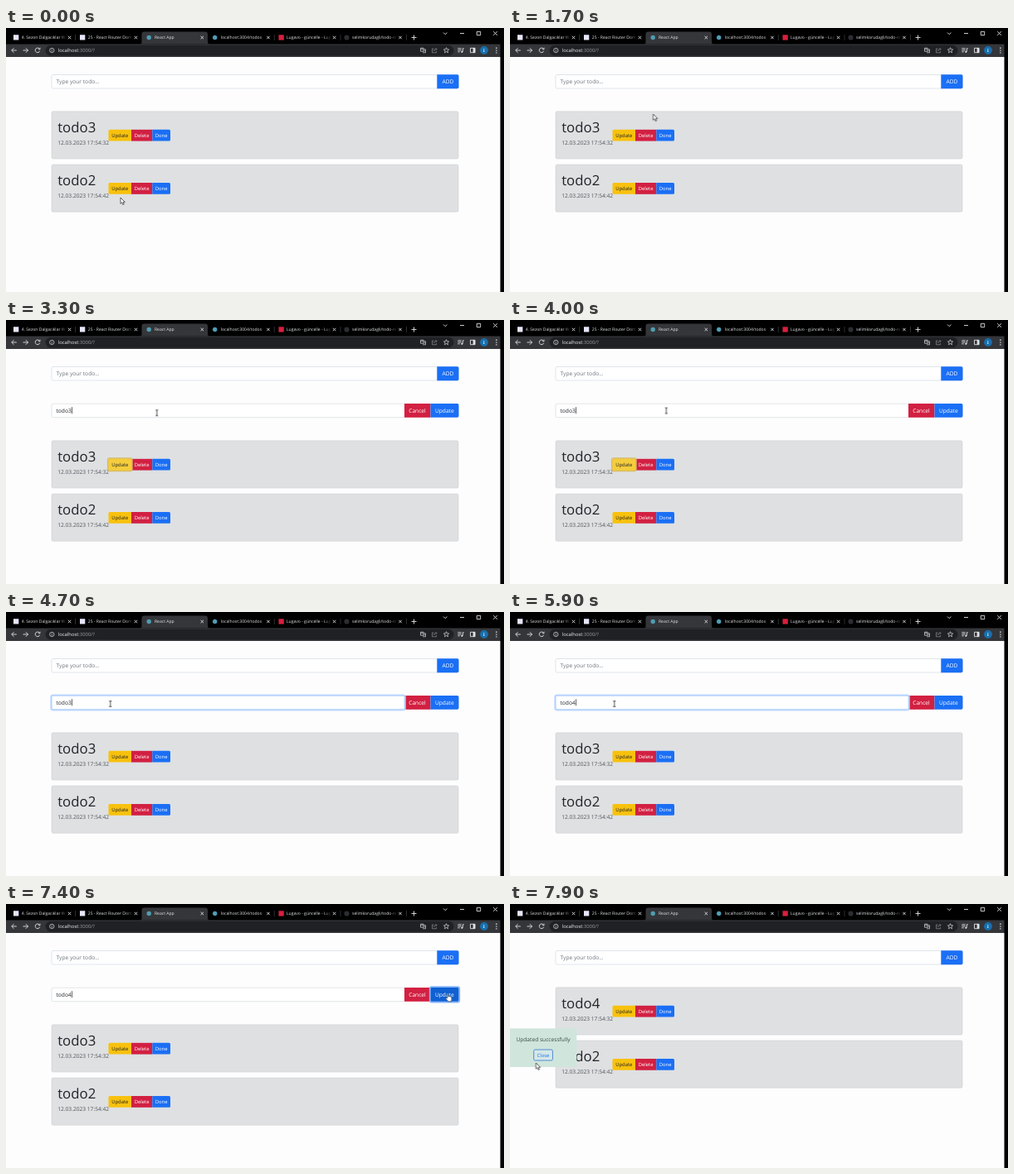
Animation of 600x319 px, one loop 8000 ms. Source, as an HTML page:

```html
<!DOCTYPE html>
<html lang="tr">
<head>
<meta charset="utf-8">
<title>React App</title>
<style>
html, body { margin: 0; width: 100%; height: 100%; overflow: hidden; background: #000; }
svg { display: block; width: 600px; height: 319px; }
text { font: 6.65px "Open Sans", "Noto Sans", sans-serif; fill: #212529; text-rendering: geometricPrecision; white-space: pre; }
.tabs text { font-size: 5.05px; fill: #e4e6e9; }
.url text { font-size: 5.85px; fill: #9aa0a6; }
.line { fill: none; stroke: #dfe1e5; stroke-width: .9; }
.title { font-size: 16.8px; font-weight: 500; }
.date { fill: #50555a; }
.small text { font-size: 5.9px; }
.mid { text-anchor: middle; }
.on { fill: #fff; }
.card { fill: #dee0e2; stroke: #c8cacd; stroke-width: .5; }
.field { fill: #fff; stroke: #ced4da; stroke-width: .6; }
.blue { fill: #1a6ff5; }
.red { fill: #d22042; }
.yellow { fill: #f8c10d; }

/* One loop is 8 s, so 1.25% is 100 ms */
.step { animation: 8s step-end infinite; }
.fade { animation: 8s linear infinite; }
.list { animation-name: list; }
.edit { animation-name: edit; }
.before { animation-name: before; }
.after { animation-name: after; }
.val3 { animation-name: val3; }
.val0 { animation-name: val0; }
.val4 { animation-name: val4; }
.warn { animation-name: warn; }
.focus { animation-name: focus; }
.caret { animation-name: caret; }
.save { animation-name: save; }
.ring { animation-name: ring; }
.toast { animation-name: toast; }
.pointer { animation: move 8s ease-in-out infinite; }
.arrow { animation-name: arrow; }
.beam { animation-name: beam; }
.hand { animation-name: hand; }

@keyframes list { 0%, 93.75%, 100% { transform: none; } 28.75% { transform: translateY(45px); } }
@keyframes edit { 0%, 93.75%, 100% { visibility: hidden; } 28.75% { visibility: visible; } }
@keyframes before { 0% { visibility: visible; } 93.75%, 100% { visibility: hidden; } }
@keyframes after { 0% { visibility: hidden; } 93.75%, 100% { visibility: visible; } }
@keyframes val3 { 0%, 66.25%, 100% { visibility: hidden; } 28.75% { visibility: visible; } }
@keyframes val0 { 0%, 71.25%, 100% { visibility: hidden; } 66.25% { visibility: visible; } }
@keyframes val4 { 0%, 93.75%, 100% { visibility: hidden; } 71.25% { visibility: visible; } }
@keyframes warn { 0%, 26.25% { opacity: 0; } 28.75%, 55.6% { opacity: 1; } 57.5%, 100% { opacity: 0; } }
@keyframes focus { 0%, 55.6% { opacity: 0; } 57.5%, 89.4% { opacity: 1; } 91.25%, 100% { opacity: 0; } }
@keyframes caret {
  0%, 62.2%, 78%, 89.4%, 100% { visibility: hidden; }
  55.6%, 66.25%, 71.25%, 84.6% { visibility: visible; }
}
@keyframes save { 0%, 87.25% { opacity: 0; } 89%, 93.7% { opacity: 1; } 93.75%, 100% { opacity: 0; } }
@keyframes ring { 0%, 89.4% { opacity: 0; } 91.25%, 93.7% { opacity: 1; } 93.75%, 100% { opacity: 0; } }
@keyframes toast { 0% { visibility: hidden; } 95%, 100% { visibility: visible; } }
@keyframes move {
  0%, 4% { transform: translate(138px, 205px); }
  11.25% { transform: translate(145px, 188px); }
  21.25% { transform: translate(172.5px, 104px); }
  26.9%, 33.75% { transform: translate(136.7px, 131px); }
  43.75%, 50% { transform: translate(188.3px, 109.5px); }
  55%, 80% { transform: translate(125.7px, 111px); }
  85% { transform: translate(400px, 128px); }
  88.75%, 93.75% { transform: translate(532.3px, 108px); }
  98.1%, 100% { transform: translate(31.3px, 192px); }
}
@keyframes arrow {
  0%, 28.75%, 82%, 93.75%, 100% { visibility: visible; }
  26.25%, 39.4%, 87.25% { visibility: hidden; }
}
@keyframes beam { 0%, 82%, 100% { visibility: hidden; } 39.4% { visibility: visible; } }
@keyframes hand {
  0%, 28.75%, 93.75%, 100% { visibility: hidden; }
  26.25%, 87.25% { visibility: visible; }
}
</style>
</head>
<body>
<svg viewBox="0 0 600 319">
  <defs>
    <linearGradient id="dim"><stop stop-color="#000" stop-opacity="0"/><stop offset="1"/></linearGradient>
    <g id="x"><path class="line" d="M-1.7-1.7 1.7 1.7M1.7-1.7-1.7 1.7"/></g>
    <g id="cut"><path fill="url(#dim)" d="M0 5h9v12H0z"/><path d="M9 5h10v12H9z"/></g>
    <g id="actions" class="small">
      <path class="yellow" d="M151 122.8v13.8h-26a1.5 1.5 0 0 1-1.5-1.5v-10.8a1.5 1.5 0 0 1 1.5-1.5z"/>
      <path class="red" d="M151 122.8h25.3v13.8H151z"/>
      <path class="blue" d="M176.3 122.8h20.2a1.5 1.5 0 0 1 1.5 1.5v10.8a1.5 1.5 0 0 1-1.5 1.5h-20.2z"/>
      <text class="mid" x="137.3" y="131.9">Update</text>
      <text class="mid on" x="163.6" y="131.9">Delete</text>
      <text class="mid on" x="187.1" y="131.9">Done</text>
    </g>
  </defs>

  <!-- Tab strip -->
  <path d="M0 0h600v319H0z"/>
  <path fill="#35363a" d="M161 19.5q2.5 0 2.5-2.5V7.500q0-3 3-3h73.500q3 0 3 3V17q0 2.500 2.500 2.500z"/>
  <g class="tabs">
    <path fill="#e6e5fb" d="M9 8.300h6.300v6.300H9zM89 8.300h6.300v6.300H89z"/>
    <circle cx="172.200" cy="11.500" r="2.700" fill="#4f9db4"/>
    <circle cx="251.700" cy="11.500" r="2.700" fill="#4f9db4"/>
    <path fill="#d8203f" d="M328.500 8.300h6.300v6.300h-6.300z"/>
    <circle cx="410.500" cy="11.500" r="3.100" fill="#2b2d31"/>
    <text x="18.800" y="13.300">4. Sezon Dalgacıklar We</text>
    <text x="98.800" y="13.300">25 - React Router Dom</text>
    <text x="179" y="13.300">React App</text>
    <text x="258.800" y="13.300">localhost:3004/todos</text>
    <text x="338" y="13.300">Lugavo - güncelle - Lug</text>
    <text x="417" y="13.300">selimkorudagli/todo-re</text>
    <use href="#cut" x="64"/><use href="#cut" x="144"/>
    <use href="#cut" x="383"/><use href="#cut" x="462"/>
    <use href="#x" x="76.500" y="11.500"/><use href="#x" x="156.500" y="11.500"/>
    <use href="#x" x="236.300" y="11.500"/><use href="#x" x="316" y="11.500"/>
    <use href="#x" x="395.500" y="11.500"/><use href="#x" x="475" y="11.500"/>
    <path class="line" style="stroke:#4a4c50;stroke-width:.6" d="M83.500 8v7M323.300 8v7M403 8v7M482.500 8v7"/>
    <path class="line" d="M488.500 11.500h6M491.500 8.500v6M527 5.500l2.200 2.200 2.200-2.200M547 6.500h5M567.300 4.300h4.400v4.400h-4.400zM587.200 4.200l4.600 4.600M591.800 4.200l-4.600 4.600"/>
  </g>

  <!-- Toolbar -->
  <path fill="#35363a" d="M0 19.500h595.500V35H0z"/>
  <rect x="47.500" y="20.800" width="492" height="12.600" rx="6.300" fill="#202124"/>
  <g class="line">
    <path d="M12.800 27H6.800M9.500 24.200 6.700 27l2.800 2.800M20.500 27h6M23.800 24.200l2.800 2.800-2.800 2.800M40.300 25.200a2.800 2.800 0 1 0 .4 2.500M41 23.700v2h-2"/>
    <circle cx="55.300" cy="27" r="2.700" stroke-width=".7"/>
    <path stroke-width=".7" d="M55.300 26.600v2M55.300 25.100v.7"/>
    <path stroke-width=".7" d="M499.500 24.200h3.500v4h-3.500zM503 25.800h2.500v4h-3.300M500.300 25.500h2M503.600 28.500l1-1.500"/>
    <path stroke="#8d9196" stroke-width=".7" d="M515.500 25h-2v4.800h5V28M515.300 28q.3-2.500 3.500-2.500M517.500 24l1.500 1.500-1.500 1.500"/>
    <path stroke-width=".7" d="M530.500 23.700l.9 2.200 2.300.1-1.800 1.500.6 2.300-2-1.300-2 1.300.6-2.300-1.800-1.500 2.300-.1z"/>
    <path d="M544.300 24.800h4.400M544.300 26.800h4.400M544.300 28.800h2.500M550.300 28.500v-3.700h1.500"/>
    <path d="M559.500 24.300h5.500v5.400h-5.500z"/>
  </g>
  <path fill="#dfe1e5" d="M562.700 24h2.500v6h-2.500zM590.200 23.600h1.300v1.300h-1.300zM590.200 26.400h1.300v1.300h-1.300zM590.200 29.200h1.300v1.300h-1.300z"/>
  <circle cx="549.300" cy="28.800" r="1.100" fill="#dfe1e5"/>
  <circle cx="576" cy="27" r="4.900" fill="#176fae"/>
  <text class="mid on" style="font-size:5px" x="576" y="28.800">E</text>
  <g class="url"><text x="62.800" y="29.100"><tspan fill="#f1f3f4">localhost</tspan>:3000/?</text></g>

  <!-- Page -->
  <path fill="#fdfdfe" d="M0 35h595.500v284H0z"/>
  <rect class="field" x="55" y="56.500" width="490" height="16.500" rx="1.600"/>
  <path class="blue" d="M519.300 56.300h24.500a1.700 1.700 0 0 1 1.700 1.700v13.500a1.700 1.700 0 0 1-1.700 1.700h-24.500z"/>
  <text x="60.500" y="67.200" fill="#6c757d" style="fill:#6c757d">Type your todo...</text>
  <text class="mid on" x="532.400" y="67.200">ADD</text>

  <g class="step edit">
    <rect class="field" x="55" y="101.200" width="426" height="16.500" rx="1.600"/>
    <path class="red" d="M480 101h31.500v16.800H480z"/>
    <path class="blue" d="M511.500 101h32.300a1.700 1.700 0 0 1 1.700 1.700v13.400a1.700 1.700 0 0 1-1.700 1.700h-32.300z"/>
    <g class="fade focus">
      <rect x="54.200" y="100.300" width="426.600" height="18.300" rx="2.300" fill="none" stroke="#c2dbfe" stroke-width="1.800"/>
      <rect x="55.100" y="101.200" width="425" height="16.500" rx="1.600" fill="#fff" stroke="#86b7fe" stroke-width=".6"/>
    </g>
    <rect class="fade save" x="511.500" y="101" width="34" height="16.800" rx="1.700" fill="#0f60d2"/>
    <rect class="fade ring" x="510.700" y="100.200" width="35.600" height="18.400" rx="2.200" fill="none" stroke="#82b2f7" stroke-width="1.700"/>
    <text class="mid on" x="495.500" y="111.800">Cancel</text>
    <text class="mid on" x="528.300" y="111.800">Update</text>
  </g>
  <text class="step val3" x="60.500" y="111.800">todo3</text>
  <text class="step val0" x="60.500" y="111.800">todo</text>
  <text class="step val4" x="60.500" y="111.800">todo4</text>
  <g class="step caret">
    <path class="step val3" d="M79.100 105.300h.6v8h-.6z"/>
    <path class="step val0" d="M75.300 105.300h.6v8h-.6z"/>
    <path class="step val4" d="M79.100 105.300h.6v8h-.6z"/>
  </g>

  <g class="step list">
    <rect class="card" x="55" y="100.800" width="490" height="57.200" rx="1.800"/>
    <text class="title step before" x="62.200" y="125.800">todo3</text>
    <text class="title step after" x="62.200" y="125.800">todo4</text>
    <text class="date" x="62.200" y="140.900">12.03.2023 17:54:32</text>
    <use href="#actions"/>
    <g class="fade warn small">
      <rect x="122.700" y="122" width="29.200" height="15.400" rx="2.200" fill="#f5cd3c" stroke="#d9bd6a" stroke-width="1.500"/>
      <text class="mid" x="137.300" y="131.900">Update</text>
    </g>
    <rect class="card" x="55" y="165" width="490" height="57.200" rx="1.800"/>
    <text class="title" x="62.200" y="190">todo2</text>
    <text class="date" x="62.200" y="205.100">12.03.2023 17:54:42</text>
    <use href="#actions" y="64.200"/>
  </g>

  <g class="step toast small">
    <path fill="#d0e6dc" d="M0 150.300h78.500q1.800 0 1.800 1.800v43.200q0 1.800-1.800 1.800H0z"/>
    <text style="font-size:6.65px;fill:#3c4a45" class="mid" x="40" y="165.500">Updated successfully</text>
    <rect x="28.700" y="176" width="22.700" height="13" rx="1.600" fill="#d6e8e6" stroke="#3f7fd6" stroke-width=".9"/>
    <text class="mid" style="fill:#1a6ff5" x="40" y="184.700">Close</text>
  </g>

  <g class="pointer">
    <path class="step arrow" d="M0 0v7.300l1.700-1.500 1.200 2.700 1.300-.6-1.200-2.600h2.300z" fill="#fff" stroke="#222" stroke-width=".7"/>
    <path class="step beam" d="M-1.500-3.300H1.500M0-3.300V3.300M-1.500 3.300H1.500" fill="none" stroke="#222" stroke-width=".8"/>
    <path class="step hand" d="M-.7.600q.7-1.200 1.400 0V4q.7-.7 1.300 0 .7-.6 1.300.2 1-.4 1.400.6V7.500L3.900 9.800H.4L-2.400 6.200q-.2-1.200 1-.9l.7.700z" fill="#fff" stroke="#222" stroke-width=".6"/>
  </g>
</svg>
</body>
</html>
```
